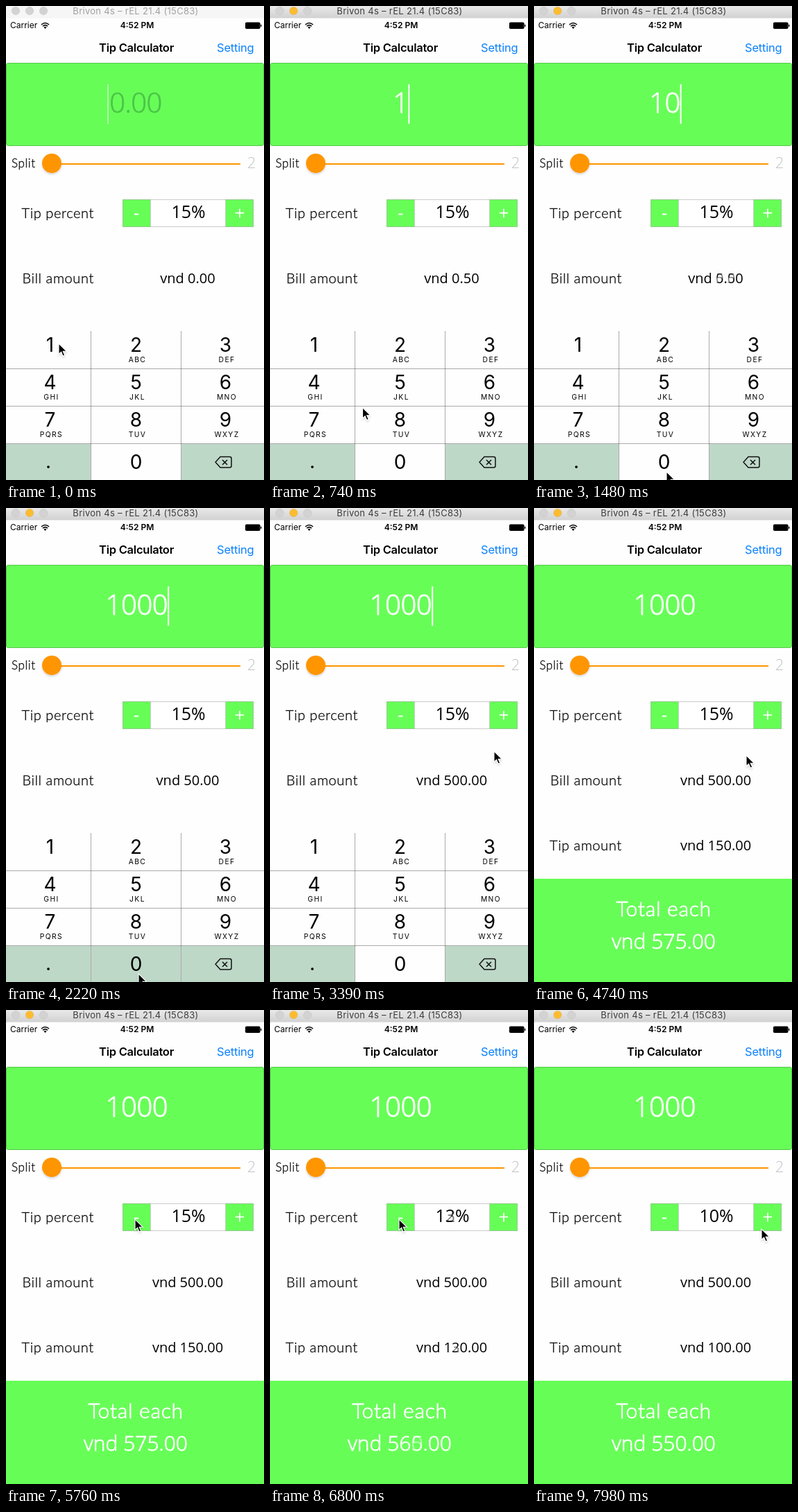
These frames come from a looping animation (372 by 684 pixels, 8 s). An HTML page:

```html
<!DOCTYPE html>
<html lang="en">
<head>
<meta charset="utf-8">
<title>Tip Calculator</title>
<style>
  html, body { margin: 0; width: 100%; height: 100%; overflow: hidden; background: #fefefe; }
  svg { display: block; width: 372px; height: 684px; }
  text { white-space: pre; }
  .ui { font-family: Inter, Roboto, sans-serif; }
  .word { font-family: Lato, "Open Sans", sans-serif; font-weight: 300; letter-spacing: .6px; stroke: #000; stroke-width: .3; }
  .num { font-family: "Open Sans", "Noto Sans", sans-serif; }
  .mid { text-anchor: middle; }
  .light { font-weight: 300; fill: #fff; stroke: #fff; stroke-width: .8; }
  .fade { isolation: isolate; }
  .fade text + text { mix-blend-mode: plus-lighter; }
</style>
</head>
<body>
<svg id="stage" viewBox="0 0 372 684"></svg>
<script>
const LOOP = 8000, HOLD = 145;
const GREEN = '#67fd57', TINT = '#bed8c8', ORANGE = '#ff9500';

const text = (x, y, size, cls, str, more = '') =>
  `<text x="${x}" y="${y}" font-size="${size}" class="${cls}" ${more}>${str}</text>`;
const rect = (x, y, w, h, fill, more = '') =>
  `<rect x="${x}" y="${y}" width="${w}" height="${h}" fill="${fill}" ${more}/>`;
const fadeLabel = (id, x, y, size, cls) =>
  `<g id="${id}" class="fade">${text(x, y, size, cls + ' mid', '').repeat(2)}</g>`;

function keypad() {
  const letters = ['', 'ABC', 'DEF', 'GHI', 'JKL', 'MNO', 'PQRS', 'TUV', 'WXYZ'];
  const centers = [63.5, 187.5, 316.5];
  let out = rect(0, 469, 372, 215, '#fefefe') +
    rect(0, 632, 122, 52, TINT) + rect(253, 632, 119, 52, TINT) +
    rect(0, 469, 122, 54, TINT, 'id="key1"') + rect(123, 632, 129, 52, TINT, 'id="key0"');
  letters.forEach((word, i) => {
    const x = centers[i % 3], y = 499 + 54 * Math.floor(i / 3);
    out += text(x, y, 28, 'ui mid', i + 1) +
      text(x + 2, y + 15, 10.3, 'ui mid', word, 'letter-spacing="1.4"');
  });
  return out + text(187.5, 668, 28, 'ui mid', 0) + text(61, 667, 28, 'ui mid', '.') +
    `<path d="M122.5 469V684M252.5 469V684M0 523.5H372M0 577.5H372M0 631.5H372" stroke="#000" stroke-opacity=".33"/>
     <path d="M309 650.5H322.5Q325 650.5 325 653V663.5Q325 666 322.5 666H309L302 658.3ZM312 655L319 662M319 655L312 662"
       fill="none" stroke="#111" stroke-width="1.5" stroke-linejoin="round"/>`;
}

const stage = document.getElementById('stage');
stage.innerHTML = `
  <defs>
    <linearGradient id="bar" x2="0" y2="1">
      <stop stop-color="#e9e9e9"/><stop offset="1" stop-color="#d1d1d1"/>
    </linearGradient>
    <filter id="soft" x="-50%" y="-50%" width="200%" height="200%">
      <feDropShadow dx="0" dy="2" stdDeviation="1.5" flood-opacity=".16"/>
    </filter>
  </defs>
  ${rect(0, 0, 372, 684, '#fefefe')}
  ${rect(0, 0, 372, 17.5, '#f6f6f6', 'id="bar-bg"')}
  ${[14, 34, 54].map(x => `<circle class="dot" cx="${x}" cy="7" r="5.8" fill="#d3d3d3" stroke="#000" stroke-opacity=".1" stroke-width=".6"/>`).join('')}
  ${text(187, 12, 13, 'ui mid', 'Brivon 4s – rEL 21.4 (15C83)', 'id="title" letter-spacing=".3"')}
  ${text(6, 32, 12, 'ui', 'Carrier')}
  <path d="M51 27Q56.5 22 62 27M53 29.2Q56.5 26 60 29.2" fill="none" stroke="#000" stroke-width="1.6"/>
  <path d="M54.5 30.5Q56.5 29 58.5 30.5L56.5 33Z"/>
  ${text(189, 32, 12, 'ui mid', '4:52 PM', 'font-weight="600"')}
  ${rect(345, 23.5, 21.5, 9.5, '#000', 'rx="1.8"')}${rect(367, 26.7, 1.3, 3.2, '#000')}
  ${text(188, 66, 16.5, 'ui mid', 'Tip Calculator', 'font-weight="600" letter-spacing="-.25"')}
  ${text(304, 66, 16.5, 'ui', 'Setting', 'fill="#0a80ff" letter-spacing="-.2"')}

  ${rect(.5, 82.5, 371, 119, GREEN, 'rx="2.5" stroke="#55c94b"')}
  ${text(187, 154, 40, 'num mid', '0.00', 'id="hint" font-weight="300" fill="#4cc348" stroke="#4cc348" stroke-width=".6" letter-spacing="-.6"')}
  ${text(188.4, 154, 40, 'num mid light', '', 'id="entry" letter-spacing="-.4"')}
  ${rect(0, 113, 2, 57, '#fff', 'id="caret"')}

  ${text(8, 233, 17, 'word', 'Split')}
  ${rect(66, 227, 272, 2, ORANGE)}
  <circle cx="66" cy="227" r="14" fill="${ORANGE}" filter="url(#soft)"/>
  ${text(354, 234, 22, 'num mid', 2, 'font-weight="300" fill="#c4c4c8"')}

  ${text(22.5, 306, 20, 'word', 'Tip percent')}
  ${rect(168, 279, 189, 40, '#fff')}
  ${rect(168, 279, 40, 40, GREEN)}${rect(317, 279, 40, 40, GREEN)}
  <path d="M168.5 279.5H356.5V318.5H168.5ZM208.5 279V319M316.5 279V319" fill="none" stroke="#aaa" stroke-opacity=".6"/>
  ${text(188, 307, 24, 'num mid light', '-')}${text(337, 308, 25, 'num mid light', '+')}
  ${fadeLabel('percent', 263, 306, 25, 'num')}

  ${text(23.5, 400, 20, 'word', 'Bill amount')}
  ${fadeLabel('bill', 262, 400, 20, 'num')}
  ${text(22.5, 494, 20, 'word', 'Tip amount')}
  ${fadeLabel('tip', 262, 494, 20, 'num')}
  ${rect(0, 535, 372, 149, GREEN)}
  ${text(187, 588.5, 30, 'word mid light', 'Total each', 'style="letter-spacing:.7px"')}
  ${fadeLabel('total', 187, 636, 30, 'num light')}

  <g id="keypad">${keypad()}</g>
  <path id="cursor" d="M0 0V15.5L3.6 12.2L6 18L8.7 16.9L6.2 11.2H11.2Z"
    stroke="#fff" stroke-width="1.1" filter="url(#soft)"/>`;

const $ = id => document.getElementById(id);
const dots = document.querySelectorAll('.dot');

const typing = [[0, ''], [290, '1'], [1340, '10'], [1780, '100'], [2220, '1000']];
const bills = [[0, 0], [440, .5], [1480, 5], [1920, 50], [2360, 500]];
const percents = [[0, 15], [6210, 14], [6500, 13], [6800, 12], [7090, 11], [7540, 10]];
const blinks = [[0, .5], [140, 1], [2660, .5], [2800, 0], [3250, .5], [3390, 1], [3690, 0]];
const slides = [[0, 0], [3690, 120], [3840, 215]];
// start, end, number of steps, then where the pointer arrives
const moves = [
  [440, 1040, 4, 191, 672], [2213, 2360, 1, 194, 647], [2360, 2950, 4, 323, 351],
  [4593, 4740, 1, 306, 357], [4740, 5760, 7, 186, 302], [7540, 7980, 3, 328, 316]
];

const indexAt = (list, t) => list.findLastIndex(e => e[0] <= t);
const valueAt = (list, t) => list[indexAt(list, t)][1];
const within = (t, a, b) => t >= a && t < b;
const money = v => 'vnd ' + v.toFixed(2);

function showFade(id, list, t, format) {
  const i = indexAt(list, t), [now, old] = $(id).children;
  const mixing = i > 0 && t - list[i][0] < HOLD;
  now.textContent = format(list[i][1]);
  old.textContent = mixing ? format(list[i - 1][1]) : '';
  now.style.opacity = mixing ? .5 : 1;
  old.style.opacity = .5;
}

function pointerAt(t) {
  let x = 76, y = 487;
  for (const [start, end, steps, toX, toY] of moves) {
    if (t < start) break;
    const p = Math.min(1, Math.floor((t - start) / (end - start) * steps) / steps);
    const k = p * p * (3 - 2 * p);
    x += (toX - x) * k;
    y += (toY - y) * k;
  }
  return [x, y];
}

function draw(t) {
  const active = t >= 140;
  $('bar-bg').setAttribute('fill', active ? 'url(#bar)' : '#f6f6f6');
  $('title').setAttribute('fill', active ? '#3c3c3c' : '#a0a0a0');
  dots[1].setAttribute('fill', active ? '#fdbc30' : '#d3d3d3');

  const entry = valueAt(typing, t);
  $('entry').textContent = entry;
  $('hint').style.opacity = entry ? 0 : 1;
  $('caret').setAttribute('x', entry ? 188 + entry.length * 11.3 : 146);
  $('caret').style.opacity = valueAt(blinks, t);

  showFade('percent', percents, t, p => p + '%');
  showFade('bill', bills, t, money);
  showFade('tip', percents, t, p => money(p * 10));
  showFade('total', percents, t, p => money(500 + p * 5));

  $('key1').style.opacity = within(t, 290, 440) ? 1 : 0;
  $('key0').style.opacity = [1340, 1780, 2220].some(s => within(t, s, s + 140)) ? 1 : 0;
  $('keypad').setAttribute('transform', `translate(0 ${valueAt(slides, t)})`);
  $('cursor').setAttribute('transform', `translate(${pointerAt(t)})`);
}

function tick() {
  draw(performance.now() % LOOP);
  requestAnimationFrame(tick);
}
tick();
</script>
</body>
</html>
```
